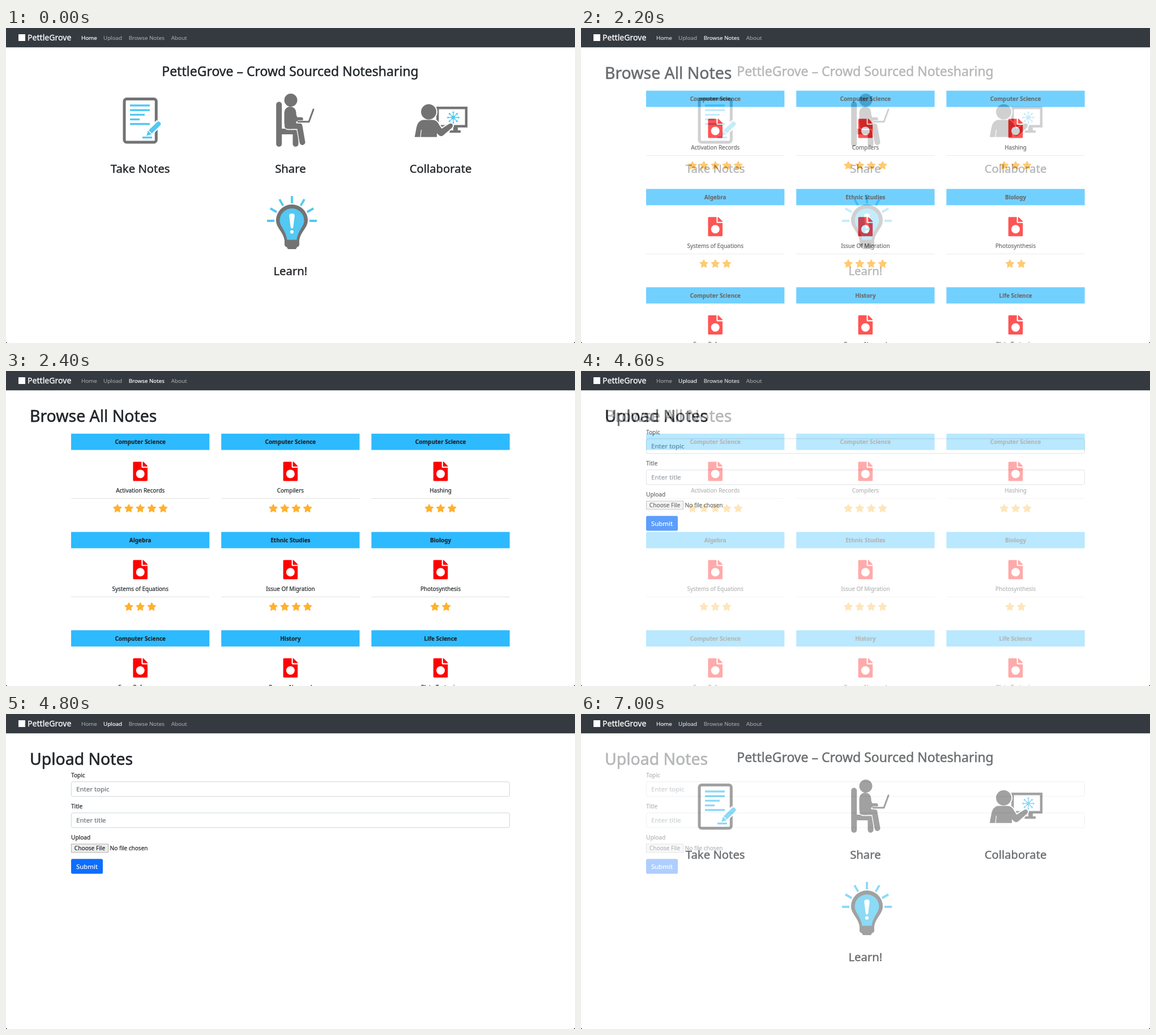
These frames come from a looping animation (1005x557 px, 7.2 s). An HTML page:

```html
<!DOCTYPE html>
<html lang="en">
<head>
<meta charset="utf-8">
<title>PettleGrove</title>
<style>
  html, body { margin: 0; width: 100%; height: 100%; overflow: hidden; background: #111; }
  svg { display: block; width: 1005px; height: 557px; border-radius: 0 0 4px 4px; background: #fff; }
  text {
    font-family: "Noto Sans", "Open Sans", sans-serif; white-space: pre;
    color: #212529; fill: currentColor; stroke: currentColor; stroke-width: .02em;
  }
  .nav text { color: #fff; }
  .gray { fill: #737373; }
  .blue { fill: #52c8f2; }
  .grayLine { fill: none; stroke: #737373; }
  .blueLine { fill: none; stroke: #52c8f2; }
  .gap { fill: none; stroke: #fff; }
</style>
</head>
<body>
<svg id="stage" viewBox="0 0 1005 557">
  <defs>
    <g id="file">
      <path fill="#f00" transform="scale(.0666)" d="M224 136V0H24C11 0 0 11 0 24v464c0 13 11 24 24 24h336c13 0 24-11 24-24V160H248c-13 0-24-11-24-24zM384 122v6H256V0h6c6 0 13 2 17 7l98 98c5 5 7 11 7 17z"/>
      <circle cx="12.8" cy="21.5" r="7.5" fill="#fff"/>
    </g>
    <path id="star" fill="#ffb12e" stroke="#ffb12e" stroke-width="1.4" stroke-linejoin="round"/>
  </defs>
  <g id="screens"></g>
  <g class="nav" id="nav"></g>
</svg>
<script>
const HOLD = 2000, STEP = 200, PART = HOLD + 2 * STEP;
const COLS = [237.2, 502.4, 767.6];
const $ = id => document.getElementById(id);

const text = (x, y, size, str, attrs = "") =>
  `<text x="${x}" y="${y}" font-size="${size}" ${attrs}>${str}</text>`;
const centered = (x, y, size, str, attrs = "") =>
  text(x, y, size, str, `text-anchor="middle" ${attrs}`);
const polar = (r, deg) => {
  const a = deg * Math.PI / 180;
  return [r * Math.cos(a), -r * Math.sin(a)];
};
const spoke = (cx, cy, r1, r2, deg) => {
  const [x1, y1] = polar(r1, deg), [x2, y2] = polar(r2, deg);
  return `M${cx + x1} ${cy + y1}L${cx + x2} ${cy + y2}`;
};

$("star").setAttribute("d", "M" + Array.from({ length: 10 }, (_, i) =>
  polar(i % 2 ? 3.7 : 7.3, 90 + i * 36).join(" ")).join("L") + "Z");

function notepad() {
  const lines = [[137, 254], [145.2, 254], [153.4, 245], [161.6, 236], [169.8, 254]]
    .map(([y, x]) => `M219 ${y}H${x}`).join("");
  return `<rect class="grayLine" x="209" y="125.5" width="56.3" height="76.5" rx="4" stroke-width="5"/>
    <path class="blueLine" stroke-width="3.4" d="${lines}M241 193.6H258"/>
    <path class="gap" stroke-width="13" d="M251 187L271 167.5"/>
    <path class="blueLine" stroke-width="8" d="M254.8 183.6L267 171.8"/>
    <path class="blueLine" stroke-width="8" stroke-linecap="round" d="M267 171.8L269.3 169.5"/>
    <path class="blue" d="M248 190.8L250.8 181.6L257.2 188Z"/>`;
}

function reader() {
  return `<g stroke-linecap="round" stroke-linejoin="round">
    <path class="grayLine" stroke-width="10" d="M482.2 135.5V205"/>
    <path class="grayLine" stroke-width="10" d="M484 183H511.5V205"/>
    <path class="gap" stroke-width="12.5" d="M498 174H518.5L523.5 202"/>
    <path class="grayLine" stroke-width="21" d="M502 149.500V168"/>
    <path class="grayLine" stroke-width="10" d="M497 173.500H518.5L523.500 202"/>
    <path class="grayLine" stroke-width="7.500" d="M507 150L512 161.500H521"/>
    <path class="gap" stroke-width="5.500" d="M517 166H535"/>
    <path class="grayLine" stroke-width="3" d="M516 165.800H535L543 144"/>
    <circle class="gray" cx="503" cy="127.600" r="11.500"/></g>`.replace(/(\.\d)00/g, "$1");
}

function teamwork() {
  const angles = Array.from({ length: 8 }, (_, i) => i * 45);
  const dots = angles.map(a => {
    const [x, y] = polar(9.3, a);
    return `<circle class="blue" cx="${790 + x}" cy="${158.3 + y}" r="1.6"/>`;
  }).join("");
  const body = "M721.8 192.8L725 176Q727.5 163 738 162.5H753C760 162.5 763 167 765.5 172L769.5 178L782 170Q787 167 789 171Q790 174 787 177L772 190Q768 193 764 189L761 186V192.8Z";
  return `<rect class="grayLine" x="762.3" y="141.3" width="50.6" height="32.4" stroke-width="4.4"/>
    <path class="gray" d="M790 175H798V181H803V185.3H783.5V181H790Z"/>
    <path class="blueLine" stroke-width="1.4" d="${angles.map(a => spoke(790, 158.3, 0, 9, a)).join("")}"/>
    ${dots}<circle class="blue" cx="790" cy="158.3" r="3.2"/>
    <circle cx="746.6" cy="148.3" r="15.5" fill="#fff"/>
    <path class="gray" stroke="#fff" stroke-width="4" paint-order="stroke" d="${body}"/>
    <circle class="gray" cx="746.6" cy="148.3" r="13.5"/>
    <path class="gap" stroke-width="1.2" d="M733.5 180L732 193"/>`;
}

function bulb() {
  const rays = Array.from({ length: 7 }, (_, i) => spoke(505, 341, 31, 44, i * 30)).join("");
  return `<path class="blueLine" stroke-width="3.8" d="${rays}"/>
    <path class="gray" d="M477 340a28 28 0 0 1 56 0C533 354 520 360 518 376V383Q518 386 514 387.5L512 391H498L496 387.5Q492 386 492 383V376C490 360 477 354 477 340Z"/>
    <path class="blue" d="M483.5 340.5a21.5 21.5 0 0 1 43 0C526.5 351 515.5 358 513.5 374.5H496.5C494.5 358 483.5 351 483.5 340.5Z"/>
    <path fill="#fff" d="M500.2 332Q500.2 328 505 328T509.8 332L507.2 353Q505 356 502.8 353Z"/>
    <circle cx="505" cy="360.6" r="3.1" fill="#fff"/>`;
}

function home() {
  return centered(502, 84.9, 23, "PettleGrove – Crowd Sourced Notesharing") +
    notepad() + reader() + teamwork() + bulb() +
    ["Take Notes", "Share", "Collaborate"].map((s, i) => centered(COLS[i], 255.8, 20.3, s)).join("") +
    centered(502.4, 437.4, 20.3, "Learn!");
}

function card([topic, title, stars], i) {
  const cx = COLS[i % 3], dy = Math.floor(i / 3) * 173.8, left = cx - 122.2;
  let out = `<rect x="${left}" y="${110.8 + dy}" width="244.3" height="28.8" fill="#2dbaff"/>` +
    centered(cx, 129.2 + dy, 9.98, topic, 'font-weight="700" stroke="none"') +
    `<use href="#file" x="${cx - 12.8}" y="${160.4 + dy}"/>` +
    centered(cx, 215 + dy, 9.95, title) +
    `<rect x="${left}" y="${225.2 + dy}" width="244.3" height=".8" fill="#d9d9d9"/>`;
  for (let k = 0; k < stars; k++)
    out += `<use href="#star" x="${cx + (k - (stars - 1) / 2) * 20.2}" y="${243.3 + dy}"/>`;
  return out;
}

function browse() {
  return text(42, 90.3, 28.4, "Browse All Notes") + [
    ["Computer Science", "Activation Records", 5],
    ["Computer Science", "Compilers", 4],
    ["Computer Science", "Hashing", 3],
    ["Algebra", "Systems of Equations", 3],
    ["Ethnic Studies", "Issue Of Migration", 4],
    ["Biology", "Photosynthesis", 2],
    ["Computer Science", "Error References", 0],
    ["History", "Roman Numeral", 0],
    ["Life Science", "Plate Tectonics", 0]
  ].map(card).join("");
}

function field(y, label, hint) {
  return text(115, y, 10.1, label) +
    `<rect x="115.4" y="${y + 8.2}" width="774" height="26" rx="2.8" fill="#fff" stroke="#ced4da"/>` +
    text(124, y + 25.4, 11.5, hint, 'style="color:#6c757d"');
}

function upload() {
  return text(42, 90.3, 28.4, "Upload Notes") +
    field(111.6, "Topic", "Enter topic") + field(166.7, "Title", "Enter title") +
    text(115, 221.8, 10.1, "Upload") +
    `<rect x="115.4" y="230" width="65.2" height="14.6" fill="#efefef" stroke="#a5a5a5" stroke-width=".9"/>` +
    centered(148, 240.9, 10.15, "Choose File") + text(183.6, 240.9, 10.04, "No file chosen") +
    `<rect x="115" y="256.2" width="56" height="26.4" rx="2.8" fill="#0d6efd"/>` +
    text(124, 273.5, 11.4, "Submit", 'style="color:#fff"');
}

$("screens").innerHTML = [home, browse, upload]
  .map(draw => `<g><rect width="1005" height="557" fill="#fff"/>${draw()}</g>`).join("");
$("nav").innerHTML = `<rect width="1005" height="34.2" fill="#343a40"/>
  <rect x="22" y="11" width="12" height="12" fill="#fff"/>` +
  text(38, 22, 14.1, "PettleGrove") +
  [[133, "Home"], [172, "Upload"], [216.7, "Browse Notes"], [291.8, "About"]]
    .map(([x, s]) => text(x, 20.8, 9.75, s, 'class="link" font-weight="500" opacity=".5"')).join("");

const screens = [...$("screens").children];
const [homeLink, uploadLink, browseLink] = document.querySelectorAll(".link");
const links = [homeLink, browseLink, uploadLink];
let shown = "";

function render(t) {
  const cur = Math.floor(t / PART) % 3, next = (cur + 1) % 3;
  const mix = Math.max(0, Math.floor((t % PART - HOLD) / STEP) + 1) / 3;
  const key = cur + ":" + mix;
  if (key === shown) return;
  shown = key;
  $("screens").append(screens[next]); // incoming screen on top
  screens.forEach((s, i) => {
    const weight = i === cur ? 1 - mix : i === next ? mix : 0;
    s.setAttribute("opacity", i === cur ? 1 : weight);
    links[i].setAttribute("opacity", 0.5 + 0.5 * Math.sqrt(weight));
  });
}

const start = performance.now();
function tick(now) {
  render(Math.max(0, now - start) % (3 * PART));
  requestAnimationFrame(tick);
}
render(0);
requestAnimationFrame(tick);
</script>
</body>
</html>
```
